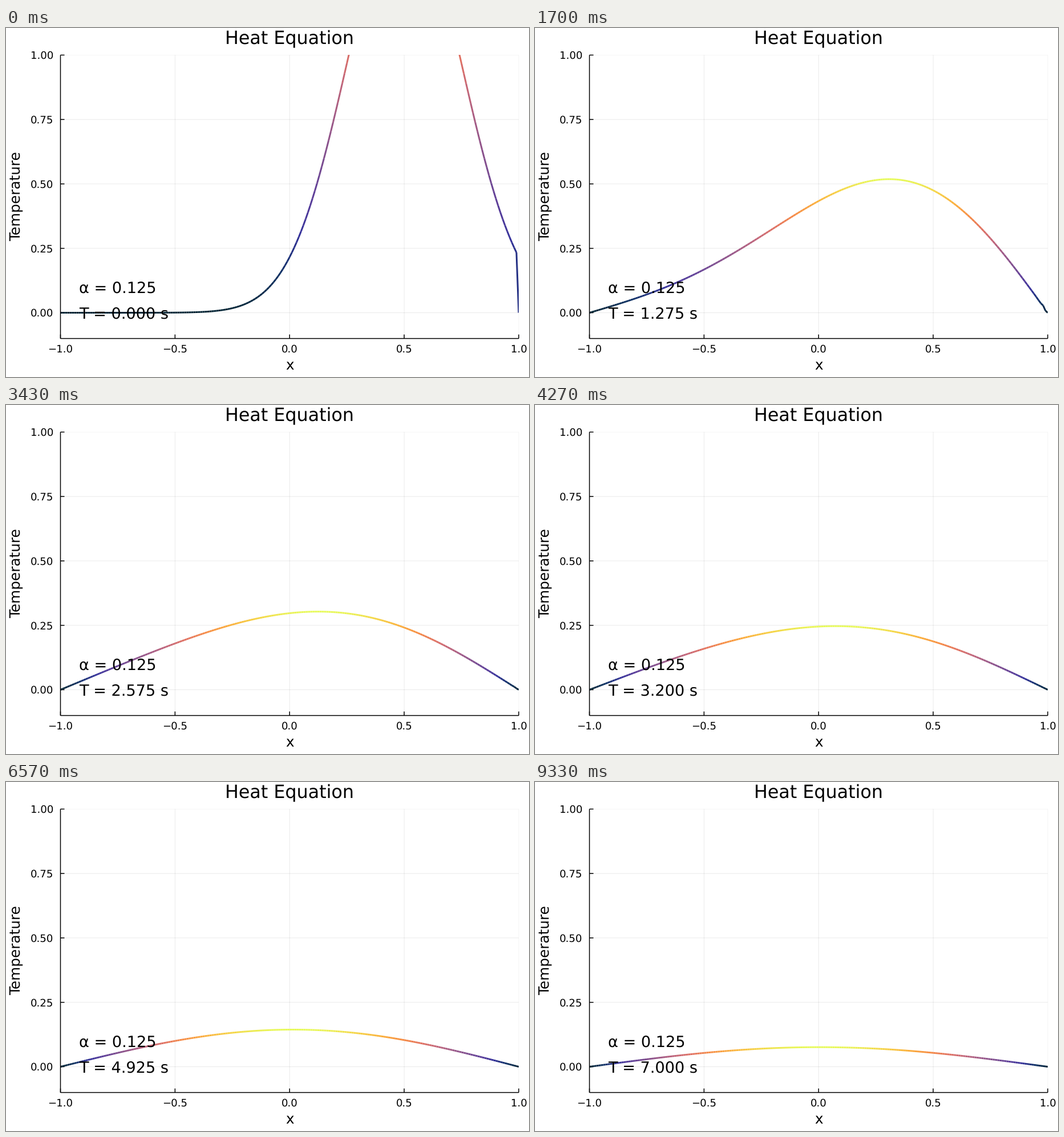
These frames come from a looping animation (917x611 px, 9360 ms). A matplotlib script:

```python
import numpy as np
import matplotlib.pyplot as plt
from matplotlib.animation import FuncAnimation
from matplotlib.collections import LineCollection
from matplotlib.colors import LinearSegmentedColormap

plt.rcParams["font.family"] = "DejaVu Sans"
plt.rcParams["text.hinting"] = "no_hinting"

W, H, DPI = 917, 611, 64
PX = 72 / DPI                                  # points per pixel
LEFT, RIGHT, TOP, BOTTOM = 95.5, 899, 47.4, 543.6
INTERVAL, FRAMES = 20, 468
STATES = 281                                   # three states per five frames

ALPHA, DT, DX, SIGMA = 0.125, 0.025, 0.01, 0.25


def solve():
    """Crank-Nicolson heat equation, ends held at zero."""
    x = np.linspace(-1, 1, 201)
    u = np.exp(-((x - 0.5) / SIGMA) ** 2 / 2) / (SIGMA * np.sqrt(2 * np.pi))
    u[0] = u[-1] = 0
    n = len(x) - 2
    lap = np.eye(n, k=1) + np.eye(n, k=-1) - 2 * np.eye(n)
    half = ALPHA * DT / DX ** 2 / 2 * lap
    step = np.linalg.solve(np.eye(n) - half, np.eye(n) + half)
    states = [u]
    for _ in range(STATES - 1):
        u = np.zeros_like(u)
        u[1:-1] = step @ states[-1][1:-1]
        states.append(u)
    return x, states


x, states = solve()

thermal = LinearSegmentedColormap.from_list("thermal", [
    "#032333", "#0d3064", "#35329b", "#5d3e99", "#7e4d8f", "#9e5987",
    "#c16479", "#e17161", "#f68b45", "#fbad3c", "#f6d346", "#e7fa5a"])

fig = plt.figure(figsize=(W / DPI, H / DPI), dpi=DPI, facecolor="white")
ax = fig.add_axes([LEFT / W, 1 - BOTTOM / H, (RIGHT - LEFT) / W, (BOTTOM - TOP) / H])
ax.set_xlim(-1, 1)
ax.set_ylim(-0.1, 1)
ax.axis("off")


def label(px, py, text, size, ha="center", **kw):
    return fig.text(px / W, 1 - py / H, text, size=size * PX, ha=ha,
                    va="baseline", color="black", **kw)


def line(xs, ys, width=1.5, alpha=1.0, z=1.5):
    ax.plot(xs, ys, color="black", lw=width * PX, alpha=alpha, zorder=z,
            clip_on=False, solid_capstyle="butt", snap=False)


def grid(xs, ys, edge):
    line(xs, ys, 0.8, 0.05 if edge else 0.1, 1)


def number(v, digits):
    return f"{v:.{digits}f}".replace("-", "\u2212")


tick_x = 7 * 2 / (RIGHT - LEFT)
tick_y = 7 * 1.1 / (BOTTOM - TOP)

for v in (-1, -0.5, 0, 0.5, 1):
    px = LEFT + (v + 1) / 2 * (RIGHT - LEFT)
    if v > -1:
        grid([v, v], [-0.1, 1], v == 1)
    line([v, v], [-0.1, -0.1 + tick_y])
    label(px, 567.7, number(v, 1), 18.1)

for v in (0, 0.25, 0.5, 0.75, 1):
    py = BOTTOM - (v + 0.1) / 1.1 * (BOTTOM - TOP)
    grid([-1, 1], [v, v], v == 1)
    line([-1, -1 + tick_x], [v, v])
    label(83.3, py + 6.6, number(v, 2), 18.1, "right")

line([-1, -1], [-0.1, 1])
line([-1, 1], [-0.1, -0.1])

label(497.3, 27.7, "Heat Equation", 31.7)
label(497.3, 598.4, "x", 24.8)
label(25, 294.5, "Temperature", 24.8, rotation=90, rotation_mode="anchor")
label(127.6, 463.4, f"α = {ALPHA}", 27.1, "left")
clock = label(127.6, 508.5, "", 27.1, "left")

curve = LineCollection([], cmap=thermal, linewidths=3 * PX, zorder=2)
curve.set_snap(False)
ax.add_collection(curve, autolim=False)


def draw(i):
    k = (3 * i + 2) // 5
    u = states[k]
    points = np.column_stack([x, u])
    curve.set_segments(np.stack([points[:-1], points[1:]], axis=1))
    curve.set_array(u[:-1])
    curve.set_clim(u.min(), u.max())
    clock.set_text(f"T = {k * DT:.3f} s")
    return curve, clock


anim = FuncAnimation(fig, draw, frames=FRAMES, interval=INTERVAL,
                     repeat=True, repeat_delay=0)
plt.show()
```
